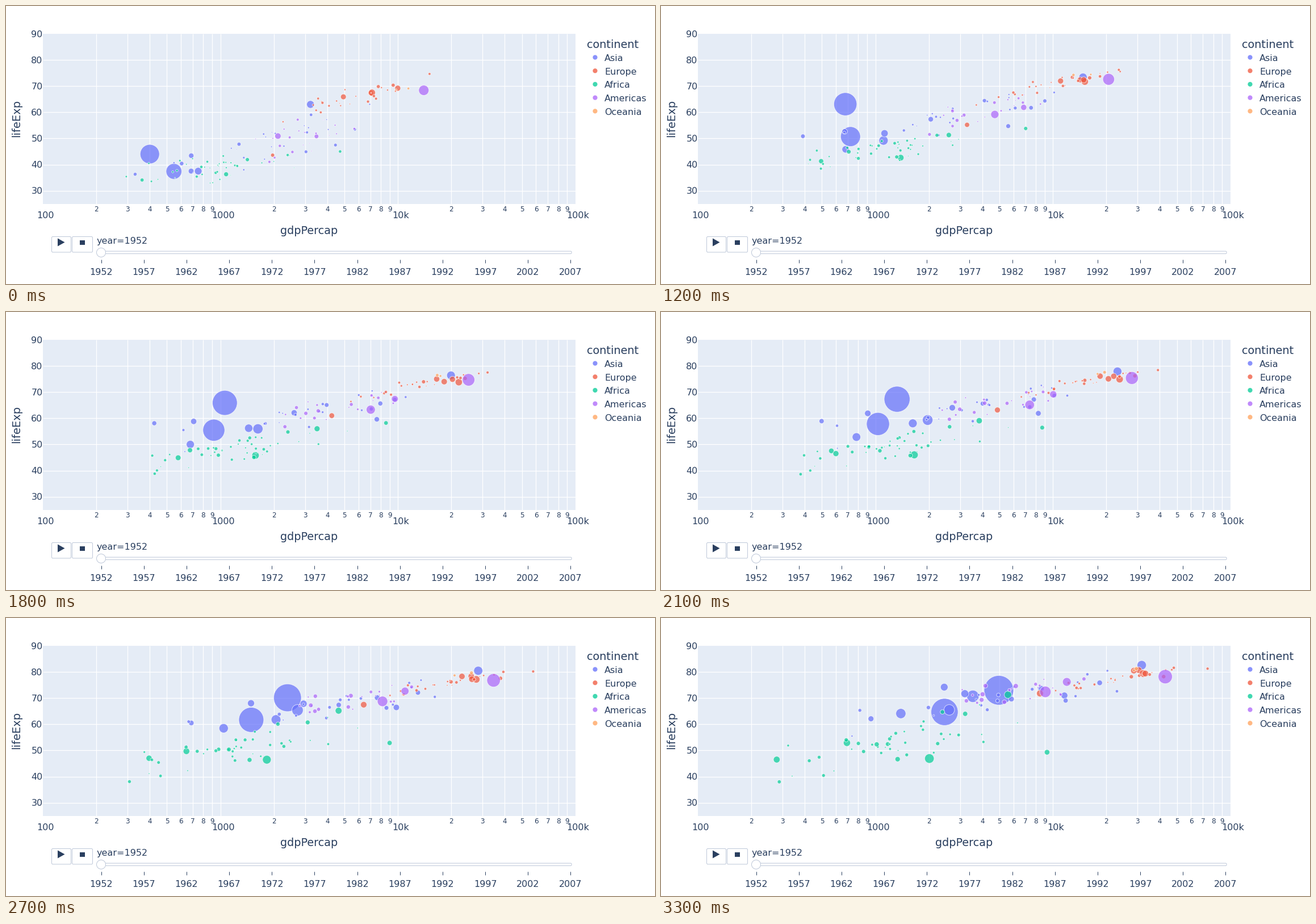
A matplotlib script that plays this animation: 1143x490 px, repeating every 3.6 s.

```python
import numpy as np
import matplotlib.pyplot as plt
from matplotlib.animation import FuncAnimation
from matplotlib.colors import to_rgba
from matplotlib.patches import Circle, FancyBboxPatch, Polygon, Rectangle

W, H, DPI = 1143, 490, 64
PT = 72 / DPI  # points per pixel
STEPS, INTERVAL = 12, 300
INK, BORDER, PLOT_BG = "#2a3f5f", "#bec8d9", "#e5ecf6"
ASIA, EUROPE, AFRICA, AMERICAS, OCEANIA = (
    "#636efa", "#ef553b", "#00cc96", "#ab63fa", "#ffa15a")
LEFT, RIGHT, TOP, BOTTOM = 65, 1003, 49, 349

plt.rcParams["font.family"] = "DejaVu Sans"
rng = np.random.default_rng(11)


def x_of(log_gdp):
    return LEFT + 312.6 * (np.asarray(log_gdp) - 2)


def y_of(life):
    return TOP + (90 - np.asarray(life)) * 4.61


fig = plt.figure(figsize=(W / DPI, H / DPI), dpi=DPI, facecolor="white")
ax = fig.add_axes([0, 0, 1, 1])
ax.set_xlim(0, W)
ax.set_ylim(H, 0)
ax.axis("off")


def label(x, y, text, px=16, ha="center", va="baseline", **kw):
    ax.text(x, y, text, fontsize=px * PT, color=INK, ha=ha, va=va, **kw)


def line(x, y, color="white", px=1.3):
    ax.plot(x, y, color=color, lw=px * PT, solid_capstyle="butt", zorder=1.5)


def rounded(x, y, w, h, radius):
    ax.add_patch(FancyBboxPatch(
        (x, y), w, h, boxstyle=f"round,pad=0,rounding_size={radius}",
        fc="white", ec=BORDER, lw=PT))


def draw_axes():
    ax.add_patch(Rectangle((LEFT, TOP), RIGHT - LEFT, BOTTOM - TOP,
                           fc=PLOT_BG, ec="none"))
    for life in range(30, 100, 10):
        y = float(y_of(life))
        if life < 90:
            line([LEFT, RIGHT], [y, y])
        label(64.5, y + 5.8, str(life), ha="right")
    for power, name in enumerate(("100", "1000", "10k", "100k"), 2):
        label(x_of(power) + 4.5, 374, name)
    for power in (2, 3, 4):
        for digit in range(1, 10):
            x = x_of(power + np.log10(digit))
            if x > LEFT:
                line([x, x], [TOP, BOTTOM])
            if digit > 1:
                label(x, 361.7, str(digit), 12)
    label(534, 402.5, "gdpPercap", 19.3)
    label(18.7, 197.7, "lifeExp", 19.5, va="center", rotation=90)


def draw_legend():
    label(1022.5, 74.3, "continent", 19.3, ha="left")
    items = zip(("Asia", "Europe", "Africa", "Americas", "Oceania"),
                (ASIA, EUROPE, AFRICA, AMERICAS, OCEANIA))
    for i, (name, color) in enumerate(items):
        y = 91 + 23.7 * i
        ax.add_patch(Circle((1037.5, y - 0.5), 4.1, fc=to_rgba(color, 0.75),
                            ec="none"))
        label(1054, y + 6, name, ha="left")


def draw_controls():
    rounded(80.5, 406.5, 34, 27.5, 2)
    rounded(116.5, 406.5, 36, 27.5, 2)
    ax.add_patch(Polygon([(91, 409.5), (103.5, 416.5), (91, 423.5)],
                         fc=INK, ec="none"))
    ax.add_patch(Rectangle((130, 412.5), 8.5, 8.5, fc=INK, ec="none"))
    label(159.5, 418.7, "year=1952", ha="left")
    rounded(167.5, 432.2, 828.5, 4.4, 1.5)
    ax.add_patch(Circle((167.5, 434.5), 8, fc="white", ec=BORDER, lw=PT, zorder=3))
    for i in range(STEPS):
        x = 167.5 + 75.18 * i
        line([x, x], [447, 452.5], INK, 1)
        label(x, 474, str(1952 + 5 * i))


# Steps at which the key points of a path lie, by their number.
KEYS = {3: (0, 6, 11), 5: (0, 2, 4, 8, 11)}
steps = np.arange(STEPS)
progress = steps / (STEPS - 1)
xs, ys, radii, colors = [], [], [], []


def add(color, r0, r1, log_gdp, life):
    xs.append(x_of(log_gdp))
    ys.append(y_of(life))
    radii.append(r0 + (r1 - r0) * progress)
    colors.append(color)


def big(color, r0, r1, gdp, life):
    """A large bubble that passes a few key points."""
    keys = KEYS[len(gdp)]
    add(color, r0, r1, np.interp(steps, keys, np.log10(gdp)),
        np.interp(steps, keys, life))


def crowd(color, count, r, wealth, spread, life, slope, noise, pace=1.0):
    """Small bubbles; pairs give the values at the start and at the end.

    Life follows wealth along a line that rises over time.
    """
    def blend(pair, t):
        return pair[0] + (pair[1] - pair[0]) * t

    rich, drift, luck0, luck1, size = rng.normal(size=(5, count)).clip(-1.8, 1.8)
    phase = rng.uniform(0, 2 * np.pi, count)
    t_gdp, t_life = progress ** pace, progress ** 0.75
    for i in range(count):
        place = rich[i] + 0.4 * drift[i] * progress
        wave = 0.06 * np.sin(2 * np.pi * progress + phase[i])
        offset = blend(spread, progress) * place + wave
        luck = blend(noise, progress) * blend((luck0[i], luck1[i]), progress)
        years = blend(life, t_life) + blend(slope, progress) * offset + luck
        scale = np.exp(0.35 * size[i])
        add(color, r[0] * scale, r[1] * scale,
            blend(wealth, t_gdp) + offset, np.minimum(years, 82))


def add_bubbles():
    big(ASIA, 4.9, 8.8, (684, 677, 1391), (37.5, 50, 64.1))
    big(ASIA, 17, 26, (400, 488, 677, 1656, 4959), (44, 44.5, 63.1, 68.7, 73))
    big(ASIA, 13.8, 23.8, (547, 658, 724, 1164, 2452),
        (37.4, 43.6, 50.7, 60.2, 64.7))
    big(ASIA, 6.5, 10.7, (750, 849, 1111, 2383, 3541),
        (37.5, 42.5, 49.2, 62.7, 70.7))
    big(ASIA, 3, 5.9, (3035, 7608, 11606), (44.9, 59.6, 71))
    big(ASIA, 6.7, 8.1, (3217, 6577, 14779, 26825, 31656),
        (63, 68.7, 73.4, 79.4, 82.6))
    big(ASIA, 3.2, 5, (331, 424, 944), (36.3, 58.1, 62.1))
    big(ASIA, 4.6, 9.3, (685, 1443, 2606), (43.4, 56.2, 65.5))
    big(ASIA, 3.4, 6.8, (1273, 2603, 3190), (47.8, 62.1, 71.7))
    big(ASIA, 3.7, 6.6, (605, 707, 2442), (40.4, 58.8, 74.2))
    crowd(ASIA, 22, (1.6, 2.8), (3.3, 3.75), (0.32, 0.45),
          (49, 70), (18, 12), (4.5, 3))

    big(EUROPE, 4.7, 5.6, (7030, 20294, 30470), (67.4, 74.9, 80.7))
    big(EUROPE, 6, 6.5, (7144, 22032, 32170), (67.5, 73.8, 79.4))
    big(EUROPE, 4.9, 5.5, (4931, 16537, 28570), (65.9, 75, 80.5))
    big(EUROPE, 3.4, 6, (1969, 4241, 8458), (43.6, 61, 71.8))
    big(EUROPE, 5.1, 5.6, (9980, 18232, 33203), (69.2, 74, 79.4))
    crowd(EUROPE, 24, (1.8, 2), (3.73, 4.35), (0.22, 0.24),
          (65.5, 77), (16, 11), (2, 1), 0.8)

    big(AFRICA, 2.7, 5.8, (781, 674, 278), (39.1, 47.8, 46.5))
    big(AFRICA, 3.4, 6.4, (1419, 3504, 5581), (41.9, 56, 71.3))
    big(AFRICA, 3.3, 6.2, (362, 578, 691), (34.1, 44.9, 52.9))
    big(AFRICA, 4.1, 8.3, (1077, 1577, 2014), (36.3, 45.8, 46.9))
    big(AFRICA, 2.7, 4.7, (4725, 8568, 9270), (45, 58.2, 49.3))
    crowd(AFRICA, 42, (1.4, 2.4), (2.96, 3.1), (0.24, 0.3),
          (38.5, 53), (9, 13), (3, 4.5), 0.6)

    big(AMERICAS, 5.4, 9.9, (2109, 7031, 9066), (50.9, 63.3, 72.4))
    big(AMERICAS, 3.9, 7.5, (3478, 9611, 11978), (50.8, 67.4, 76.2))
    big(AMERICAS, 9, 12.4, (13990, 25010, 42952), (68.4, 74.7, 78.2))
    crowd(AMERICAS, 20, (1.4, 2.3), (3.5, 3.83), (0.18, 0.25),
          (52, 73), (25, 9), (4, 2), 0.8)

    crowd(OCEANIA, 2, (1.5, 2.2), (4.01, 4.46), (0.02, 0.08),
          (69.2, 80.7), (5, 5), (0.3, 0.3))


draw_axes()
draw_legend()
draw_controls()
add_bubbles()

xs, ys, radii = np.array(xs), np.array(ys), np.array(radii)
dots = ax.scatter(xs[:, 0], ys[:, 0], s=1, zorder=2,
                  facecolors=[to_rgba(c, 0.7) for c in colors],
                  edgecolors=[(1, 1, 1, 0.7)], linewidths=0.95 * PT)
dots.set_clip_path(Rectangle((LEFT, TOP), RIGHT - LEFT, BOTTOM - TOP,
                             transform=ax.transData))


def update(step):
    dots.set_offsets(np.column_stack([xs[:, step], ys[:, step]]))
    dots.set_sizes((2 * radii[:, step] * PT) ** 2)
    return (dots,)


anim = FuncAnimation(fig, update, frames=STEPS, interval=INTERVAL,
                     repeat=True, repeat_delay=0)
plt.show()
```
